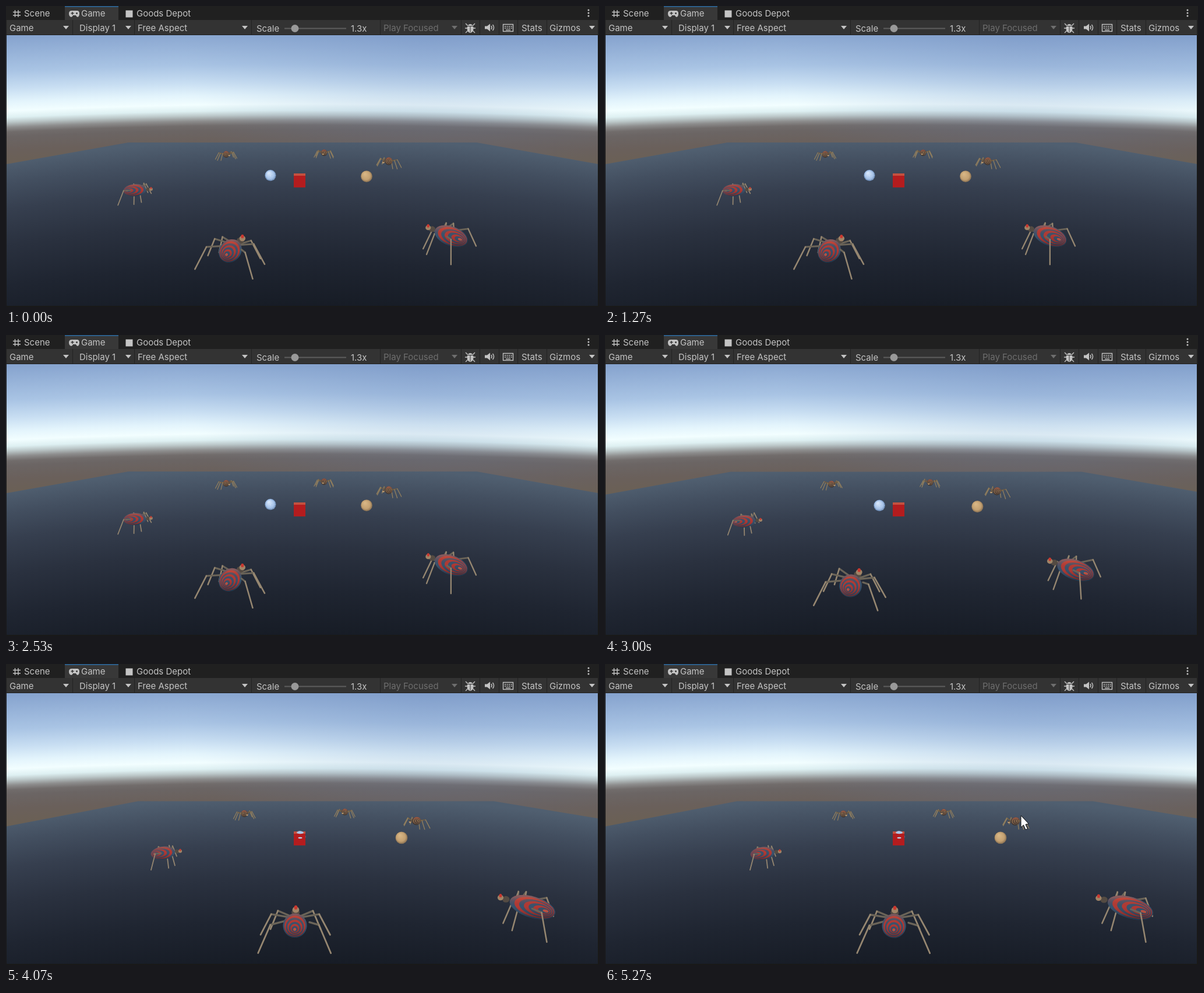
Write an HTML page with a canvas that moves like this. It is 1018 px wide and 516 px high and loops after 5.34 s.

```html
<!DOCTYPE html>
<html lang="en">
<head>
<meta charset="utf-8">
<title>Spider scene</title>
<style>
html, body { margin: 0; width: 100%; height: 100%; overflow: hidden; background: #191919; }
canvas, svg { position: absolute; left: 0; top: 0; display: block; }
text { font: 15px Inter, sans-serif; fill: #c4c4c4; }
.dim { fill: #6e6e6e; }
.icon { fill: #c4c4c4; }
.line { fill: none; stroke: #c4c4c4; stroke-width: 1.4; }
</style>
</head>
<body>
<canvas id="scene" width="1018" height="516"></canvas>
<svg width="1018" height="50" viewBox="0 0 1018 50">
  <rect width="1018" height="50" fill="#202020"/>
  <rect x="101" width="92" height="25" fill="#383838"/>
  <rect x="101" width="92" height="2" fill="#2c5d87"/>
  <rect x="1" y="24" width="1015" height="25" fill="#333"/>
  <path d="M114.500 24v25M220.500 24v25M421.500 24v25M642.500 24v25M781.500 24v25M813.500 24v25M846.500 24v25M878.500 24v25M928.500 24v25" stroke="#222"/>
  <path class="line" d="M15.500 7v12M21 7v12M12 10.500h13M12 16h13"/>
  <path class="icon" d="M113 8h9q4 0 4 5t-3 6q-2 0-3-3h-5q-1 3-3 3-4-1-4-6t5-5z"/>
  <path d="M111.500 12.500h5M114 10v5" stroke="#383838" stroke-width="1.500"/>
  <circle cx="121.500" cy="12.500" r="1.500" fill="#383838"/>
  <rect class="icon" x="205.500" y="7.500" width="12" height="12"/>
  <g class="icon"><circle cx="1000" cy="7" r="1.500"/><circle cx="1000" cy="12" r="1.500"/><circle cx="1000" cy="17" r="1.500"/></g>
  <text x="31" y="18">Scene</text>
  <text x="129" y="18">Game</text>
  <text x="224" y="18">Goods Depot</text>
  <text x="6" y="43">Game</text>
  <text x="126" y="43">Display 1</text>
  <text x="226" y="43">Free Aspect</text>
  <text x="430" y="44">Scale</text>
  <text x="592" y="44">1.3x</text>
  <text class="dim" x="648" y="43">Play Focused</text>
  <text x="885" y="43">Stats</text>
  <text x="933" y="43">Gizmos</text>
  <path class="icon" d="M98 34h10l-5 6zM205 34h10l-5 6zM405 34h10l-5 6zM1001 34h10l-5 6z"/>
  <path class="dim" d="M765 34h10l-5 6z"/>
  <rect x="478" y="37.500" width="106" height="2" fill="#5e5e5e"/>
  <circle cx="496" cy="38.500" r="6.500" fill="#999"/>
  <path class="line" d="M789 30l4 4M805 30l-4 4M788 38h18M789 46l4-4M805 46l-4-4"/>
  <ellipse class="icon" cx="797" cy="38.500" rx="5.500" ry="7.500"/>
  <path d="M792 34.500h10M797 35v10" stroke="#333"/>
  <path class="icon" d="M822 34.500h4l5-4v13l-5-4h-4z"/>
  <path class="line" d="M833 34q2 3 0 6M835.500 32q4 5 0 10"/>
  <rect class="line" x="853.500" y="31.500" width="17" height="12"/>
  <path class="line" d="M856 35h13M856 38h13" stroke-dasharray="2 1.500"/>
  <path class="line" d="M858 41.200h8"/>
</svg>
<script>
const LOOP = 5340, STEP = 600 / 9;
const ctx = document.getElementById('scene').getContext('2d');
const ramp = (t, from, to) => Math.min(1, Math.max(0, (t - from) / (to - from)));
const rad = deg => deg * Math.PI / 180;

// Perspective camera over flat ground. One unit is the leg span of a spider.
const CX = 509, HORIZON = 181, FOCAL = 445, EYE = 2.3;
const place = (x, y) => {
  const z = FOCAL * EYE / (y - HORIZON);
  return { x: (x - CX) * z / FOCAL, z };
};
const project = ({ x, z }, h = 0) => [CX + FOCAL * x / z, HORIZON + FOCAL * (EYE - h) / z];
const shift = (p, dx, dz) => ({ x: p.x + dx, z: p.z + dz });

// The camera follows the cube, so all the rest slides past it.
const SLIDE = [2620, 3705];
const pan = (p, t) => {
  const k = ramp(t, ...SLIDE);
  return shift(p, .98 * k, -.42 * k);
};

const cube = place(504, 311);
const corners = [place(210, 234), place(808, 234)];
const blueBall = place(454, 300), tanBall = place(619, 302);
const farSpiders = [place(378, 262), place(546, 259), place(657, 275)];
const nearSpiders = [place(221, 330), place(764, 417), place(385, 445)];

const BRIGHT = { tip: '#d35c48', warm: '#b53a34', cool: '#315673', head: '#a08467', dot: '#c8382f', thigh: '#6b6458', shin: '#968771' };
const DULL = { tip: '#bd9c70', warm: '#927552', cool: '#453d36', head: '#c9a878', dot: '#54382b', thigh: '#6d5c45', shin: '#94805e' };

function disc([x, y], rx, ry, fill, turn = 0) {
  ctx.beginPath();
  ctx.ellipse(x, y, rx, ry, turn, 0, 7);
  ctx.fillStyle = fill;
  ctx.fill();
}

function line(points, width, color) {
  ctx.beginPath();
  points.forEach(p => ctx.lineTo(...p));
  ctx.lineWidth = width;
  ctx.strokeStyle = color;
  ctx.stroke();
}

function polygon(points, fill) {
  ctx.beginPath();
  points.forEach(p => ctx.lineTo(...p));
  ctx.closePath();
  ctx.fillStyle = fill;
  ctx.fill();
}

// Horizontal bands that droop slightly towards both sides.
function bands(y0, y1, radius, stops) {
  const cy = y0 + radius;
  const g = ctx.createRadialGradient(CX, cy, cy - y1, CX, cy, radius);
  stops.forEach(([y, c]) => g.addColorStop((y1 - y) / (y1 - y0), c));
  return g;
}

const sky = bands(40, 290, 10800, [
  [40, '#86a3ce'], [100, '#a9c4e4'], [130, '#c8def2'], [152, '#e3f4fc'], [168, '#f2feff'],
  [179, '#def0f2'], [187, '#bcc8c9'], [196, '#8d8d8d'], [204, '#716c6b'], [212, '#6b6564'], [235, '#6a605b'], [290, '#6b604d']]);
const floor = bands(228, 530, 3400, [
  [228, '#505f70'], [265, '#434f60'], [310, '#363f4f'], [370, '#2a313f'], [440, '#1f2531'], [530, '#151a23']]);
const deepSky = ctx.createRadialGradient(720, 20, 0, 720, 20, 420);
deepSky.addColorStop(0, 'rgba(95,125,180,.25)');
deepSky.addColorStop(1, 'rgba(95,125,180,0)');

// Three legs per side, as angle from the heading and reach.
const LEGS = [[52, .46], [72, .51], [114, .5]].flatMap(([a, r]) => [[a, r], [-a, r]]);

function drawAbdomen([x, y], hx, hy, w, depth, skin) {
  const turn = Math.atan2(hy, hx), len = Math.max(Math.hypot(hx, hy), w);
  const rings = 8;
  for (let i = 0; i < rings; i++) {
    const f = 1 - i / rings, back = depth * (1 - f);
    const color = i === rings - 1 ? skin.tip : i % 2 ? skin.warm : skin.cool;
    disc([x - hx * back, y - hy * back], len * f, w * f, color, turn);
  }
  // Light from above, shade below.
  const shade = ctx.createLinearGradient(0, y - w, 0, y + w);
  shade.addColorStop(0, 'rgba(225,95,70,.5)');
  shade.addColorStop(.45, 'rgba(120,50,50,.08)');
  shade.addColorStop(1, 'rgba(8,14,24,.4)');
  disc([x, y], len, w, shade, turn);
}

function drawSpider(home, skin, t) {
  const at = pan(home, t), size = FOCAL / at.z;
  const yaw = Math.atan2(cube.x - at.x, cube.z - at.z);
  const along = (d, turn = 0, from = at) => shift(from, d * Math.sin(yaw + turn), d * Math.cos(yaw + turn));
  const bob = Math.sin(t / 2560 * 2 * Math.PI) * .014;
  const walking = Math.sin(Math.PI * ramp(t, ...SLIDE));
  const body = along(bob), height = .22 - bob;

  const mid = project(body, height), front = project(along(.27, 0, body), height);
  const hx = front[0] - mid[0], hy = front[1] - mid[1];
  const hip = project(along(.17, 0, body), height);
  const legs = LEGS.map(([deg, reach], i) => {
    const lift = walking * Math.max(0, Math.sin(t / 48 + i * Math.PI * .6)) * .05;
    const knee = along(reach * .68, rad(deg)), foot = along(reach, rad(deg));
    return { z: foot.z, knee: project(knee, .31 - bob * .6 + lift), foot: project(foot, lift) };
  }).sort((a, b) => b.z - a.z);

  const width = size * .017 + .6;
  const drawLeg = ({ knee, foot }, start) => {
    line([start, knee], width * 1.2, skin.thigh);
    line([knee, foot], width, skin.shin);
  };
  const drawHead = () => {
    const neck = project(along(.32, 0, body), height), head = project(along(.39, 0, body), height);
    disc(neck, size * .055, size * .048, '#544b43');
    disc(head, size * .045, size * .042, skin.head);
    disc([head[0], head[1] - size * .03], size * .022, size * .028, skin.dot);
  };
  const away = Math.cos(yaw) > 0;

  const nearest = legs.pop();
  legs.forEach(leg => drawLeg(leg, hip));
  if (away) drawHead();
  drawAbdomen(mid, hx, hy, size * .16, .4 + .4 * Math.abs(Math.sin(yaw)), skin);
  if (!away) drawHead();
  drawLeg(nearest, hip.map((v, i) => v + (nearest.knee[i] - v) * .6));
}

function drawBall(home, radius, [light, mid, dark], t) {
  const at = pan(home, t), [x, y] = project(at, radius), r = radius * FOCAL / at.z;
  const g = ctx.createRadialGradient(x - r * .3, y - r * .45, 1, x, y, r * 1.1);
  [light, mid, dark].forEach((c, i) => g.addColorStop([0, .65, 1][i], c));
  disc([x, y], r, r, g);
  return [x, y, r];
}

function drawProps(t) {
  drawBall(tanBall, .188, ['#d8b685', '#c3a071', '#79634a'], t);
  const [x, y, r] = drawBall(blueBall, .185, ['#d3e4fa', '#9dbce6', '#56759f'], t);
  ctx.fillStyle = 'rgba(235,245,255,.7)';
  for (let i = 0; i < 40; i++) {
    const d = Math.sqrt(i / 40) * (r - 1.5);
    ctx.fillRect(x + Math.cos(i * 2.4) * d, y + Math.sin(i * 2.4) * d, 1, 1);
  }
  ctx.fillStyle = '#b41c1e';
  ctx.fillRect(494, 290, 20, 21);
  ctx.fillStyle = '#c5503f';
  ctx.fillRect(494, 287, 20, 4);
  // The ball ends inside the cube and pokes through its faces.
  if (t >= SLIDE[1]) {
    disc([505, 289], 6, 2.2, '#a9c5e7');
    disc([505, 298], 3.5, 1.3, '#b9cfe8');
  }
}

function drawFloor(t) {
  const [left, right] = corners.map(c => pan(c, t));
  const edge = [{ x: left.x, z: 1 }, left, right, { x: right.x, z: 1 }];
  polygon(edge.map(p => project(p)), floor);
}

function drawCursor(t) {
  if (t < 4300) return;
  const k = ramp(t, 4300, 4470);
  ctx.save();
  ctx.translate(716 - 2 * k, 232 + 28 * k);
  polygon([[0, 0], [0, 20], [4.5, 16], [8, 24], [11.5, 22.5], [8, 15], [13, 14]], '#fff');
  ctx.lineWidth = 1;
  ctx.strokeStyle = '#111';
  ctx.stroke();
  ctx.restore();
}

function draw(t) {
  for (const paint of [sky, deepSky]) {
    ctx.fillStyle = paint;
    ctx.fillRect(0, 50, 1018, 466);
  }
  drawFloor(t);
  farSpiders.forEach(s => drawSpider(s, DULL, t));
  drawProps(t);
  nearSpiders.forEach(s => drawSpider(s, BRIGHT, t));
  drawCursor(t);
  ctx.fillStyle = '#191919';
  ctx.fillRect(0, 50, 1, 466);
  ctx.fillRect(1016, 50, 2, 466);
  ctx.fillRect(0, 514, 1018, 2);
}

ctx.lineCap = ctx.lineJoin = 'round';
const start = performance.now();
function tick() {
  const t = (performance.now() - start) % LOOP;
  draw(Math.floor((t + 10) / STEP) * STEP);
  requestAnimationFrame(tick);
}
tick();
</script>
</body>
</html>
```
